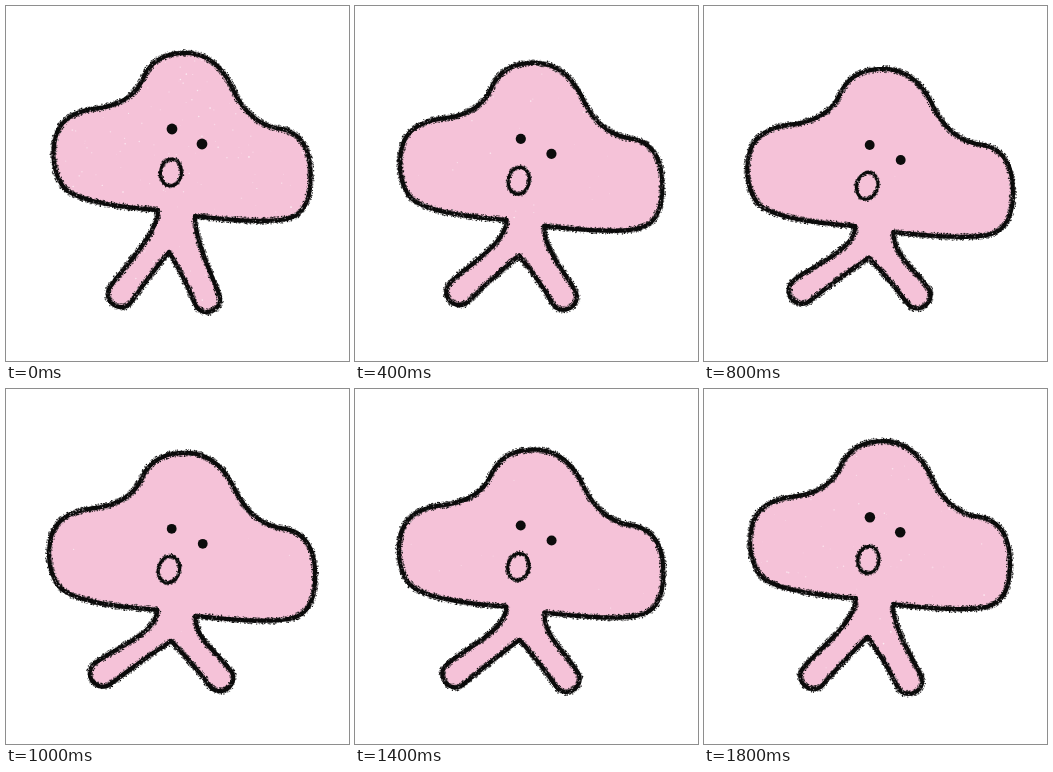
An HTML page with a canvas that plays this animation: 343x355 px, repeating every 2000 ms.

```html
<!DOCTYPE html>
<html lang="en">
<head>
<meta charset="utf-8">
<style>
  html, body { margin: 0; width: 100%; height: 100%; overflow: hidden; background: #fff; }
  canvas { display: block; }
</style>
</head>
<body>
<canvas id="stage" width="343" height="355"></canvas>
<script>
const W = 343, H = 355, STEP = 200, STEPS = 10;
const PINK = '#f5c2d8', INK = '#0c0c0c';
const ctx = document.getElementById('stage').getContext('2d');

// Control points of the head, from the left side of the neck to the right.
const HEAD = [[152, 204], [68, 198], [44, 160], [54, 107], [126, 98], [148, 47], [210, 47],
  [243, 118], [303, 127], [306, 204], [264, 219], [189, 210]];

function seeded(seed) {
  return () => {
    seed = (seed + 0x6d2b79f5) | 0;
    let t = Math.imul(seed ^ (seed >>> 15), 1 | seed);
    t = (t + Math.imul(t ^ (t >>> 7), 61 | t)) ^ t;
    return ((t ^ (t >>> 14)) >>> 0) / 4294967296;
  };
}

const middle = (a, b) => [(a[0] + b[0]) / 2, (a[1] + b[1]) / 2];

// Points about 2 px apart along an SVG path.
function sample(d) {
  const path = document.createElementNS('http://www.w3.org/2000/svg', 'path');
  path.setAttribute('d', d);
  const length = path.getTotalLength(), n = Math.ceil(length / 2);
  return Array.from({ length: n + 1 }, (_, i) => {
    const p = path.getPointAtLength(length * i / n);
    return [p.x, p.y];
  });
}

function headLine(points) {
  const last = points.length - 1;
  let d = `M${points[0]}`;
  for (let i = 1; i < last; i++) {
    d += `Q${points[i]} ${i === last - 1 ? points[last] : middle(points[i], points[i + 1])}`;
  }
  return sample(d);
}

// From the neck around a round foot to the crotch; side is -1 for left, 1 for right.
function legLine(neck, foot, crotch, side) {
  const r = 13, hip = middle(neck, crotch);
  const angle = Math.atan2(foot[1] - hip[1], foot[0] - hip[0]);
  const c = Math.cos(angle), s = Math.sin(angle);
  const at = (along, out) => [foot[0] + c * along + s * out * side, foot[1] + s * along - c * out * side];
  return sample(`M${neck}C${neck[0]} ${neck[1] + 24} ${at(-25, r)} ${at(0, r)}
    C${at(r * 1.33, r)} ${at(r * 1.33, -r)} ${at(0, -r)}Q${at(-25, -r)} ${crotch}`);
}

function ellipseLine(x, y, rx, ry, tilt) {
  const c = Math.cos(tilt), s = Math.sin(tilt);
  return Array.from({ length: 49 }, (_, i) => {
    const a = i / 24 * Math.PI, u = rx * Math.cos(a), v = ry * Math.sin(a);
    return [x + u * c - v * s, y + u * s + v * c];
  });
}

function trace(g, line) {
  g.beginPath();
  line.forEach(([x, y]) => g.lineTo(x, y));
}

function dot(g, x, y, r) {
  g.beginPath();
  g.arc(x, y, r, 0, 7);
  g.fill();
}

function charcoal(g, line, width, rand) {
  trace(g, line);
  g.lineWidth = width * 0.6;
  g.stroke();
  for (let i = 1; i < line.length; i++) {
    const [x, y] = line[i - 1], dx = line[i][0] - x, dy = line[i][1] - y;
    const length = Math.hypot(dx, dy);
    for (let n = length * width * 0.6; n > 0; n--) {
      const t = rand(), off = (rand() - 0.5) * width;
      g.fillStyle = rand() < 0.1 ? '#a89fa4' : INK;
      dot(g, x + dx * t - dy / length * off, y + dy * t + dx / length * off, 0.3 + rand() * 0.45);
    }
  }
}

// sink runs from 0 (standing tall) to 1 (lowest).
function drawPose(sink, seed) {
  const canvas = document.createElement('canvas');
  canvas.width = W;
  canvas.height = H;
  const g = canvas.getContext('2d'), rand = seeded(seed);
  const lower = ([x, y]) => [175 + (x - 175) * (1 + 0.035 * sink), y + 16.8 * sink];

  const points = HEAD.map(lower), crotch = [163 + 2 * sink, 246 + 6 * sink];
  const head = headLine(points);
  const left = legLine(points[0], [115 - 18 * sink, 288 - 3.5 * sink], crotch, -1);
  const right = legLine(points[points.length - 1], [201 + 13 * sink, 293 - 4 * sink], crotch, 1);

  g.fillStyle = '#fff';
  g.fillRect(0, 0, W, H);
  g.strokeStyle = INK;
  g.lineCap = g.lineJoin = 'round';

  g.save();
  trace(g, [...head, ...right, ...[...left].reverse()]);
  g.fillStyle = PINK;
  g.fill();
  g.clip();
  for (let n = 10 + 240 * (1 - sink) ** 2; n > 0; n--) {
    g.fillStyle = `rgba(255,255,255,${0.25 + rand() * 0.5})`;
    dot(g, 40 + rand() * 270, 50 + rand() * 255, 0.3 + rand() * 0.6);
  }
  g.restore();

  [head, right, left].forEach(line => charcoal(g, line, 7, rand));
  charcoal(g, ellipseLine(165 - 2 * sink, 166.5 + 14 * sink, 10.5, 13.5, 0.1 + 0.15 * sink), 5, rand);
  g.fillStyle = INK;
  for (const eye of [[166, 123], [196, 138]]) dot(g, ...lower(eye), 5.4 - 0.5 * sink);
  return canvas;
}

const poses = Array.from({ length: STEPS / 2 + 1 }, (_, i) =>
  drawPose(Math.sin(Math.PI * i / STEPS), i * 97 + 5));

function frame() {
  const step = Math.floor(performance.now() / STEP) % STEPS;
  ctx.drawImage(poses[Math.min(step, STEPS - step)], 0, 0);
  requestAnimationFrame(frame);
}
frame();
</script>
</body>
</html>
```
